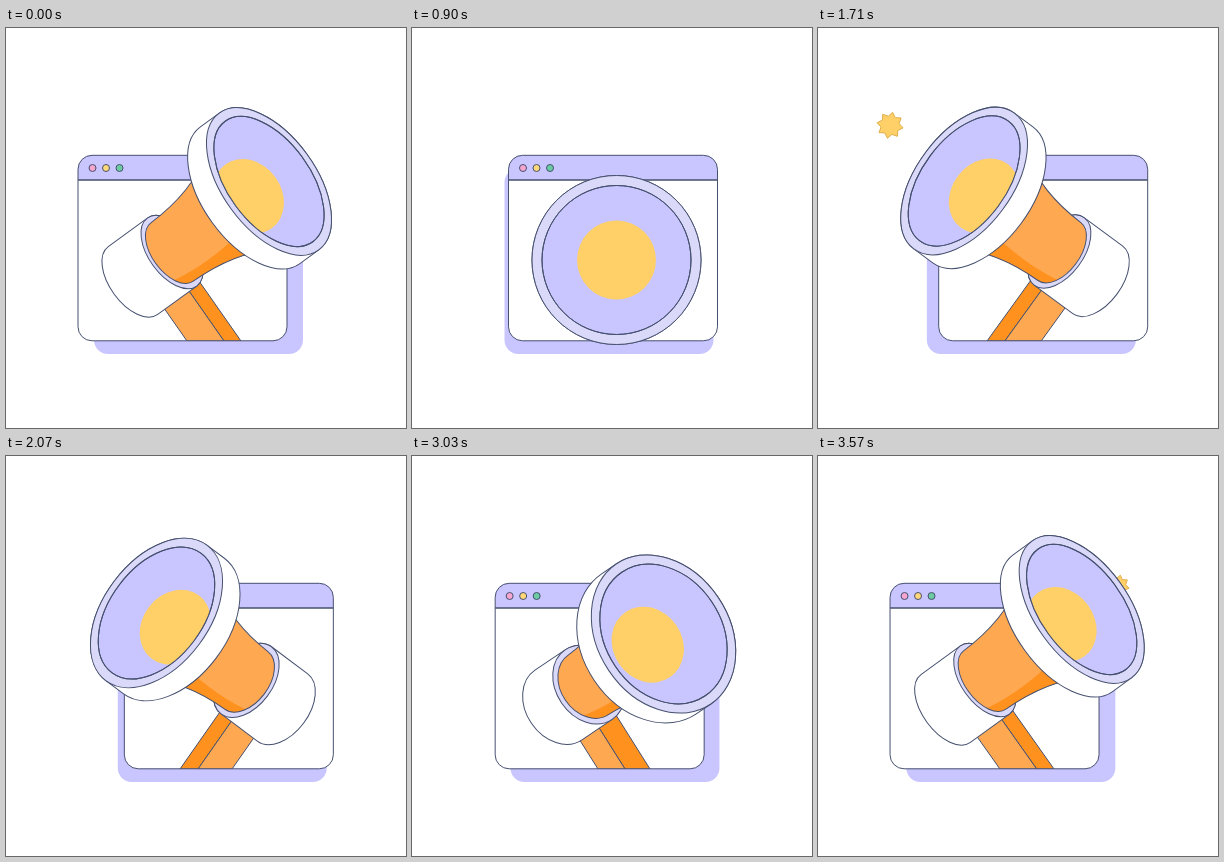
An HTML page with a canvas that plays this animation: 400x400 px, repeating every 3.6 s.

```html
<!DOCTYPE html>
<html lang="en">
<head>
<meta charset="utf-8">
<title>Megaphone</title>
<style>
html, body { margin: 0; width: 100%; height: 100%; overflow: hidden; background: #fff; }
canvas { display: block; width: 400px; height: 400px; }
</style>
</head>
<body>
<canvas id="stage" width="400" height="400"></canvas>
<script>
const LOOP = 3600, HALF = LOOP / 2, STEP = 30, MID = 203.5;
const INK = '#46506f', LILAC = '#c9c5ff', PALE = '#dbd9fa', SUN = '#ffd068',
  ORANGE = '#ffa852', DEEP = '#ff921f';
const c = document.getElementById('stage').getContext('2d');

// time, mouth centre x/y, vector from back of cup to mouth x/y
const horn = [
  [0, 263, 153.5, 136, -99], [270, 263, 160, 127, -94], [560, 261, 186, 92, -57],
  [750, 234, 218, 58, -17], [900, 204.5, 232, 0, 0], [1080, 155, 187, -95, -62],
  [1380, 151.5, 155.5, -116.5, -93.5], [1750, 146, 153, -134, -99],
  [2070, 150.5, 157, -126, -94.5], [2370, 153, 190, -97, -60],
  [2550, 174, 218.5, -58, -16], [2700, 204, 232, 0, 0], [2880, 250, 190, 92, -60],
  [3030, 251.5, 178, 105, -71], [3300, 262, 157, 128, -93], [3570, 263.7, 153.5, 136, -99]
];
// time from the far side, foot x of bright edge / fold / dark edge, lean
const handle = [
  [-900, 189, 196, 222, .2], [-570, 186, 213, 238, .63], [-420, 194, 228, 249, .8],
  [0, 181, 218, 235, .7], [270, 181, 215, 233, .7], [750, 188, 199, 224, .4],
  [900, 189, 196, 222, .2]
];

// Smooth periodic curve through unevenly spaced keys
function sample(keys, t, period) {
  const n = keys.length;
  const at = i => {
    const turn = Math.floor(i / n), k = keys[i - turn * n];
    return [k[0] + turn * period, ...k.slice(1)];
  };
  let i = n - 1;
  while (i > 0 && keys[i][0] > t) i--;
  const [a, b, d, e] = [at(i - 1), at(i), at(i + 1), at(i + 2)];
  const h = d[0] - b[0], u = (t - b[0]) / h;
  const slope = (p, q, r, j) => {
    const h1 = q[0] - p[0], h2 = r[0] - q[0];
    const s1 = (q[j] - p[j]) / h1, s2 = (r[j] - q[j]) / h2;
    return s1 * s2 <= 0 ? 0 : (h1 + h2) / (h2 / s1 + h1 / s2);
  };
  return b.slice(1).map((v, k) => {
    const j = k + 1, m0 = slope(a, b, d, j) * h, m1 = slope(b, d, e, j) * h;
    return v + u * (m0 + u * (3 * (d[j] - v) - 2 * m0 - m1 + u * (2 * (v - d[j]) + m0 + m1)));
  });
}

function linear(keys, t) {
  let i = 0;
  while (i < keys.length - 2 && keys[i + 1][0] <= t) i++;
  const a = keys[i], b = keys[i + 1], u = (t - a[0]) / (b[0] - a[0]);
  return a.slice(1).map((v, k) => v + (b[k + 1] - v) * u);
}

function paint(fill, line = INK) {
  if (fill) { c.fillStyle = fill; c.fill(); }
  if (line) { c.strokeStyle = line; c.stroke(); }
}

function oval(x, y, rx, ry, fill, line) {
  c.beginPath();
  c.ellipse(x, y, rx, ry, 0, 0, 7);
  paint(fill, line);
}

function poly(points, fill, line) {
  c.beginPath();
  points.forEach(p => c.lineTo(...p));
  c.closePath();
  paint(fill, line);
}

// Cylinder between two ovals on the axis
function tube(from, to, r, ratio, fill) {
  c.beginPath();
  c.ellipse(to, 0, r * ratio, r, 0, -Math.PI / 2, Math.PI / 2);
  c.ellipse(from, 0, r * ratio, r, 0, Math.PI / 2, Math.PI * 1.5);
  c.closePath();
  paint(fill);
}

function card(x, y) {
  c.beginPath();
  c.roundRect(x, y, 209, 185.5, 14);
}

function drawWindow(left, t) {
  card(left, 127.3);
  c.fillStyle = '#fff';
  c.fill();
  c.save();
  c.clip();
  c.fillStyle = LILAC;
  c.fillRect(left, 127, 209, 25);
  poly([[left, 152], [left + 209, 152]], null);
  ['#f7a6d0', '#ffd978', '#6ccba2'].forEach((f, i) => oval(left + 14.5 + 13.5 * i, 140, 3.5, 3.5, f));
  drawHandle(t);
  c.restore();
  card(left, 127.3);
  paint(null);
}

function drawHandle(t) {
  const q = (t + 900) % HALF - 900;
  const flip = t >= 900 && t < 2700;
  const [bright, fold, dark, lean] = linear(handle, q);
  const pt = (x, y) => [flip ? 2 * MID - x : x, y];
  const face = (a, b, fill) => poly(
    [pt(a - lean * 60, 253), pt(b - lean * 60, 253), pt(b, 313), pt(a, 313)], fill);
  face(fold, dark, DEEP);
  face(bright, fold, ORANGE);
}

function drawStar(t, x, y, begin, peak, fall, dx, dy) {
  const age = t - begin, rise = peak - begin;
  const k = age < rise ? 1 - (1 - age / rise) ** 2 : 1 - ((age - rise) / fall) ** 2;
  if (age <= 0 || k <= 0) return;
  const r = 9 + 6 * k, points = [];
  for (let i = 0; i < 16; i++) {
    const a = i * Math.PI / 8 + .2, d = i % 2 ? r * .7 : r;
    points.push([x + dx * k + d * Math.cos(a), y + dy * k + d * Math.sin(a)]);
  }
  poly(points, SUN, '#dfae4c');
}

function hornPath(s) {
  c.beginPath();
  c.moveTo(100 * s, -58);
  c.quadraticCurveTo(62 * s, -37, 0, -36);
  c.ellipse(0, 0, 36 * Math.sqrt(1 - s * s), 36, 0, -Math.PI / 2, Math.PI / 2, true);
  c.quadraticCurveTo(62 * s, 37, 100 * s, 58);
  c.closePath();
}

function drawMegaphone(x, y, dx, dy) {
  const len = Math.hypot(dx, dy), s = Math.min(len / 202, .95);
  const ratio = Math.sqrt(1 - s * s), side = dx < 0 ? -1 : 1;
  c.save();
  c.translate(x, y);
  // Mirror on the left so that the underside stays at positive y
  c.scale(side, 1);
  c.rotate(Math.atan2(dy, Math.abs(dx)));

  const neck = -144 * s;
  tube(-202 * s, neck, 42, ratio, '#fff');
  oval(neck, 0, 42 * ratio, 42, PALE);
  c.save();
  c.translate(neck, 0);
  hornPath(s);
  c.fillStyle = ORANGE;
  c.fill();
  c.save();
  c.clip();
  c.beginPath();
  c.moveTo(-25, 22);
  c.quadraticCurveTo(14, 31, 58, 25.5);
  c.lineTo(110, 20);
  c.lineTo(110, 80);
  c.lineTo(-25, 80);
  paint(DEEP, null);
  c.restore();
  hornPath(s);
  paint(null);
  c.restore();

  tube(-28 * s, 0, 84.5, ratio, '#fff');
  oval(0, 0, 84.5 * ratio, 84.5, PALE);
  oval(0, 0, 74.5 * ratio, 74.5, LILAC);
  c.save();
  c.clip();
  oval(-.15 * len, 0, 39.5 * (1 - .2 * s), 39.5, SUN, null);
  c.restore();
  oval(0, 0, 74.5 * ratio, 74.5, null);
  c.restore();
}

function draw(t) {
  c.clearRect(0, 0, 400, 400);
  c.lineWidth = 1;
  c.lineJoin = 'round';
  const a = t / LOOP * 2 * Math.PI;
  const left = 96.5 - 24.5 * Math.cos(a);
  card(left + 2.5 + 13.5 * Math.cos(a) - 6.5 * Math.sin(a), 140.5);
  paint(LILAC, null);
  drawWindow(left, t);
  const [x, y, dx, dy] = sample(horn, t, LOOP);
  drawStar(t, x, y, 1390, 1520, 350, -105, -79);
  drawStar(t < 900 ? t + LOOP : t, x, y, 3050, 3250, 394, 107, -69);
  drawMegaphone(x, y, dx, dy);
}

const start = performance.now();
function tick() {
  const t = (performance.now() - start) % LOOP;
  draw(Math.floor(t / STEP) * STEP);
  requestAnimationFrame(tick);
}
tick();
</script>
</body>
</html>
```
